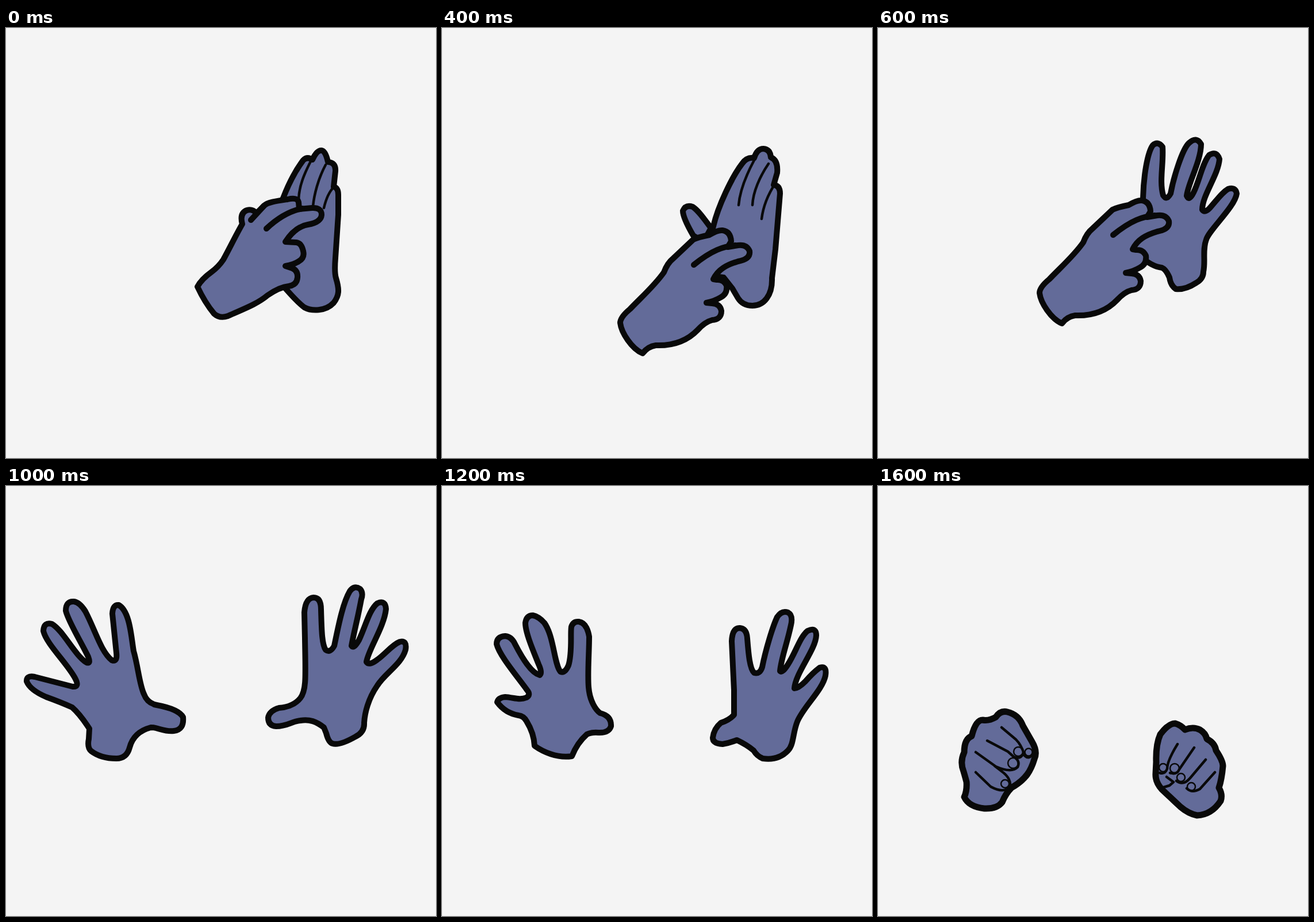
Write an HTML page without scripts that moves like this. It is 748 px wide and 748 px high and loops after 1.8 s.

```html
<!DOCTYPE html>
<html lang="en">
<head>
<meta charset="utf-8">
<title>Clapping hands</title>
<style>
  html, body { margin: 0; width: 100%; height: 100%; overflow: hidden; background: #f4f4f4; }
  svg { display: block; width: 100%; height: 100%; }
  path, circle {
    fill: none; stroke: #090909; stroke-width: 10;
    stroke-linecap: round; stroke-linejoin: round; vector-effect: non-scaling-stroke;
  }
  .skin { fill: #636b99; }
  .bold { stroke-width: 11; }
  .crease { stroke-width: 4.5; }
  .nail { stroke-width: 2.5; }
  .pose { visibility: hidden; animation: show 1800ms step-end calc(var(--i) * 200ms - 1800ms) infinite; }
  @keyframes show {
    0% { visibility: visible; }
    11.111%, 100% { visibility: hidden; }
  }
</style>
</head>
<body>
<svg viewBox="0 0 748 748">
  <defs>
    <!-- upright palm with its thumb -->
    <g id="palm">
      <path class="skin" d="M472 345C480 310 505 258 522 236Q530 224 543 226Q548 210 559 210Q571 211 572 225Q585 230 583 252L577 273Q588 274 588 288L580 385L574 435C575 465 560 483 540 483Q523 483 515 470L505 453L490 434L474 432L460 390Z"/>
      <path class="skin" d="M468 348C458 335 447 318 436 311Q424 307 419 318Q419 330 437 361L455 372Z"/>
      <path class="crease" d="M543 230C528 258 518 285 516 308M568 236C553 258 541 285 540 308M580 270C568 288 559 308 556 332"/>
    </g>
    <!-- hand striking the palm -->
    <g id="striker">
      <path class="skin" d="M310 513C312 530 330 558 349 566Q358 554 372 552C400 553 425 546 445 525Q458 511 470 508Q486 507 486 492Q484 480 470 479L460 478Q474 475 484 469Q497 463 495 448Q490 437 478 438L472 437C480 420 495 412 515 406Q537 402 535 388Q530 376 515 378L497 381L503 371Q502 354 488 352Q480 351 465 360Q445 364 437 368L402 401Q392 409 386 425C370 448 345 470 327 489Q310 503 310 513Z"/>
      <path d="M510 378C490 380 470 386 438 412"/>
    </g>
    <g id="spread">
      <path class="skin" d="M497 300C498 260 505 220 514 208Q523 200 531 211C533 240 525 270 532 295Q538 305 545 292C550 265 565 215 577 204Q590 192 598 206C598 235 575 275 573 296Q577 306 585 290C595 270 600 240 612 225Q625 217 630 232C628 260 600 295 600 320Q605 327 615 315C628 300 635 290 645 284Q658 280 660 292C657 315 612 355 607 372C600 390 606 410 602 428Q602 440 590 447Q570 460 554 458Q545 452 543 438Q537 424 530 421C505 418 490 395 470 391L420 385Q403 382 403 368Q405 353 425 354L470 361Q485 365 494 340Q498 330 497 300Z"/>
    </g>
    <path id="openLeft" class="skin" d="M96 376Q98 368 110 367C125 368 135 373 147 368Q155 363 148 355C130 330 100 295 95 275Q95 262 110 261Q121 262 127 275C140 300 155 325 170 329Q175 325 168 310C158 285 145 255 145 238Q147 225 158 225Q168 227 178 238C195 262 195 310 206 323Q214 326 220 312C227 290 223 255 225 245Q228 235 238 236Q252 238 256 262C256 290 253 325 255 350C257 375 268 390 275 395Q295 400 294 418Q290 430 272 429Q260 428 252 432Q235 447 226 470C200 474 175 462 161 452Q160 430 147 409Q142 400 133 399Q110 395 96 376Z"/>
    <path id="openRight" class="skin" d="M508 398L508 355L504 270Q505 247 518 247Q530 248 531 265C533 290 535 318 543 325Q553 328 557 315C563 285 575 245 583 228Q591 216 602 220Q611 225 607 242C600 275 590 300 588 322Q592 326 602 310C615 290 623 262 636 252Q651 245 651 260C650 285 615 325 613 352Q620 352 632 340Q645 325 657 316Q670 312 667 330C662 355 628 385 618 410C610 430 612 450 602 460Q585 478 558 474Q548 470 542 460Q530 450 513 442Q500 447 488 449Q471 448 471 438Q473 422 485 412Q500 407 508 398Z"/>
  </defs>

  <!-- clap -->
  <g class="pose" style="--i:0">
    <path class="skin" d="M482 296C492 270 505 246 517 230Q524 223 533 229Q541 212 549 213Q556 214 560 233Q574 234 573 249L570 276Q578 278 578 290L578 325L573 400Q571 425 574 435C580 455 580 465 570 478C556 493 532 493 519 486Q508 478 486 453L440 380Z"/>
    <path class="crease" d="M531 230C518 255 510 275 509 298M556 238C543 262 536 290 534 310M570 277C560 287 556 300 553 313"/>
    <path class="skin" d="M333 450C340 465 352 485 362 497Q372 506 386 501C410 490 436 481 455 465C468 456 482 450 492 449Q506 447 507 434Q508 422 498 418L486 414Q500 412 509 406Q520 400 517 388Q514 374 505 373L486 372C495 358 508 345 525 342Q548 338 549 325Q549 312 532 313L510 315L509 303Q507 294 490 298C470 301 455 303 449 309L436 322Q428 314 419 317Q406 322 411 341C400 360 388 385 378 403Q370 415 358 424Q340 437 333 450Z"/>
    <path d="M515 314C490 319 470 333 453 349M449 309L426 334"/>
  </g>

  <g class="pose" style="--i:1">
    <use href="#palm" x="1" y="-4"/>
    <use href="#striker" x="-9" y="-27"/>
  </g>

  <g class="pose" style="--i:2">
    <use href="#palm"/>
    <use href="#striker"/>
  </g>

  <g class="pose" style="--i:3">
    <use href="#spread" x="-36" y="-4"/>
    <use href="#striker" x="-29" y="-52"/>
  </g>

  <!-- thumbs touching -->
  <g class="pose" style="--i:4">
    <path class="skin" d="M198 434C206 452 218 470 236 470L241 463C260 440 280 427 310 423Q345 412 390 412Q414 412 414 396Q413 383 395 383L345 380Q332 378 329 362C326 330 340 300 366 277Q376 266 369 260Q361 255 347 264L336 268L298 259Q287 257 288 268L293 300Q280 297 269 302L277 337Q266 340 265 347L266 366Q272 370 262 380C240 405 210 418 198 434Z"/>
    <path class="crease" d="M306 288L338 289Q344 288 343 277M273 302C290 298 310 310 322 316Q328 324 322 331L303 329M272 340Q300 345 314 350Q317 360 310 365L297 365M258 380L297 392Q300 405 290 408L275 407"/>
    <path class="nail" d="M329 275L326 281Q328 286 338 285L340 278ZM310 318Q314 312 320 316L320 325Q312 328 309 322ZM300 352L308 352Q311 359 306 361L299 359ZM285 392L294 393Q296 400 291 402L284 400Z"/>
    <use href="#spread"/>
  </g>

  <!-- hands apart -->
  <g class="pose" style="--i:5">
    <path class="skin" d="M36 340Q35 329 50 332L116 349Q128 350 121 336C108 310 70 275 65 252Q66 236 80 240C100 252 120 295 140 307Q148 310 143 297C130 270 108 235 104 217Q104 200 118 201Q128 202 138 218C155 250 165 288 184 303Q194 307 192 290L185 222Q186 206 196 207C216 218 218 265 222 287C230 315 232 345 240 362Q246 378 262 381Q300 388 308 402Q310 424 292 426C275 428 265 420 252 420Q222 428 215 455Q210 474 192 474Q165 474 148 461Q141 455 144 440L145 422C138 412 130 398 115 385Q95 376 70 367Q42 355 36 340Z"/>
    <path class="skin" d="M520 265L519 220Q521 195 535 194Q548 194 548 215C549 245 549 275 556 285Q564 291 571 278C577 250 585 205 598 183Q606 172 616 179Q622 186 618 197C612 230 605 255 601 278Q605 284 614 268C625 245 632 215 646 204Q660 198 661 214C658 245 630 285 627 306Q632 313 646 302C660 292 672 276 685 271Q698 268 695 285C688 310 660 325 646 347C630 370 624 395 623 412Q624 428 608 436Q580 452 568 448Q561 446 557 430L553 420C540 410 528 405 512 408C495 410 490 418 470 418Q456 417 456 403Q458 391 475 386Q500 384 512 369C523 355 521 330 520 265Z"/>
  </g>

  <g class="pose" style="--i:6">
    <use href="#openLeft"/>
    <use href="#openRight"/>
  </g>

  <g class="pose" style="--i:7">
    <use href="#openLeft" transform="translate(35 70.5) scale(.88 .955)"/>
    <use href="#openRight" transform="translate(96.6 70.5) scale(.8 .955)"/>
  </g>

  <!-- fists -->
  <g class="pose" style="--i:8">
    <path class="skin bold" d="M205 402Q213 390 225 393Q245 398 252 417L268 445Q278 462 272 475C266 495 258 510 232 525Q222 535 216 550Q207 562 185 561Q158 558 150 541Q155 530 154 515Q152 507 149 497Q142 480 150 463Q150 440 163 435Q170 407 182 407Q193 409 205 402Z"/>
    <path class="crease" d="M215 420L240 441Q250 451 255 469Q262 476 268 468M190 443L226 462L236 471Q248 476 253 465M170 463L205 488Q232 500 243 489Q247 480 240 474M170 498L196 523Q220 536 230 522Q231 508 216 497L203 487"/>
    <g class="nails">
      <circle class="nail" cx="262" cy="463" r="6.5"/>
      <circle class="nail" cx="244" cy="462" r="8"/>
      <circle class="nail" cx="235" cy="482" r="9"/>
      <circle class="nail" cx="221" cy="518" r="7"/>
    </g>
    <path class="skin bold" d="M484 480Q483 450 491 432Q505 413 517 413Q527 416 534 424Q548 418 560 424Q570 430 572 440Q586 447 588 460Q600 478 600 487Q598 510 593 525Q600 537 596 548Q580 572 555 573Q540 570 526 558L494 528Q482 515 483 500Z"/>
    <path class="crease" d="M521 449Q503 478 503 492Q499 502 490 499M550 455L524 493Q520 503 508 499M570 476L543 508Q531 522 519 513M586 498L560 527Q546 535 537 526M502 506L514 515L507 521L497 524"/>
    <g class="nails">
      <circle class="nail" cx="496" cy="490" r="7"/>
      <circle class="nail" cx="516" cy="491" r="8"/>
      <circle class="nail" cx="527" cy="507" r="7"/>
      <circle class="nail" cx="545" cy="523" r="7"/>
    </g>
  </g>
</svg>
</body>
</html>
```
